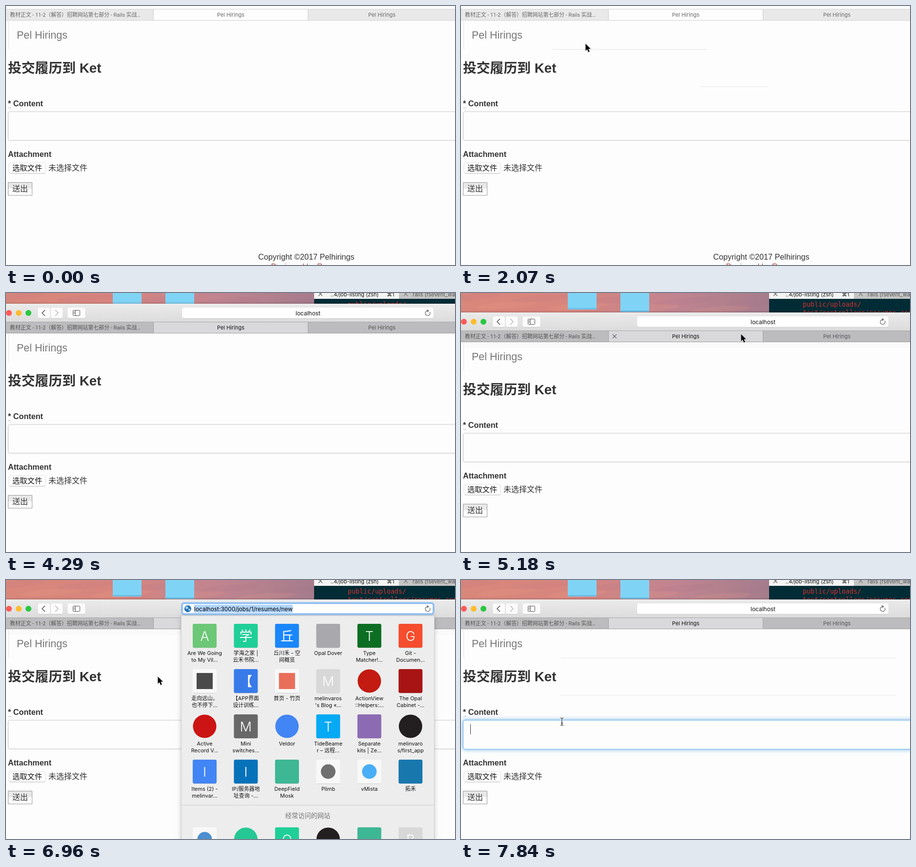
These frames come from a looping animation (921 px wide and 532 px high, 7990 ms). An HTML page with a canvas:

```html
<!DOCTYPE html>
<html lang="zh">
<head>
<meta charset="utf-8">
<title>Pel Hirings</title>
<style>
html, body { margin: 0; width: 921px; height: 532px; overflow: hidden; background: #fdfdfd; }
canvas { display: block; }
</style>
</head>
<body>
<canvas id="stage" width="921" height="532"></canvas>
<script>
const W = 921, H = 532, LOOP = 7990, STEP = LOOP / 54;
const c = document.getElementById('stage').getContext('2d');
const UI = 'Inter, "Noto Sans CJK SC", sans-serif';
const WEB = '"Liberation Sans", "Noto Sans CJK SC", sans-serif';
const MONO = '"DejaVu Sans Mono", monospace';
const SITE = 'Pel Hirings', URL_TEXT = 'localhost:3000/jobs/1/resumes/new';

// Pointer path: [step, x, y]; each run is one visit to the stage.
const visits = [
  [[3, 606, 268], [5, 500, 130], [7, 452, 16], [9, 452, 16], [10, 400, 60], [11, 290, 115],
   [12, 205, 131], [13, 189, 115], [14, 255, 77], [17, 474, -12]],
  [[23, 722, 22], [24, 727, 15]],
  [[32, 760, 50], [35, 574, 84], [39, 602, 66], [41, 602, 66], [44, 420, 165], [46, 325, 202],
   [47, 311, 198], [48, 307, 215], [50, 240, 290], [51, 215, 300], [53, 207, 291]]
];

// Favourites: [tile colour, glyph or shape, first line, second line]
const sites = [
  ['#6cc777', 'A', 'Are We Going', 'to My Vil...'],
  ['#20cf98', '学', '学海之家 |', '云禾书院…'],
  ['#1a87fd', '丘', '丘川禾 - 空', '间概览'],
  ['#a9a9ad', 'square', 'Opal Dover'],
  ['#0b6e22', 'T', 'Type', 'Matcher!...'],
  ['#f54d2d', 'G', 'Git -', 'Documen...'],
  ['#4a4a4a', 'inset', '走向远山，', '也不停下…'],
  ['#387be8', '【', '【APP界面', '设计训练…'],
  ['#ea6f5a', 'inset', '首页 - 竹页'],
  ['#d8d8d8', 'M', 'melinvaros', "'s Blog «..."],
  ['#c31a12', 'circle', 'ActionView', '::Helpers:...'],
  ['#a81414', 'square', 'The Opal', 'Cabinet -...'],
  ['#cc1414', 'circle', 'Active', 'Record V...'],
  ['#686868', 'M', 'Mini', 'switches...'],
  ['#4285f4', 'circle', 'Veldor'],
  ['#05a9f4', 'T', 'TideBeame', 'r – 远程…'],
  ['#8d6bb3', 'square', 'Separate', 'kits | Ze...'],
  ['#231f20', 'circle', 'melinvaro', 's/first_app'],
  ['#4285f4', 'I', 'Items (2) -', 'melinvar...'],
  ['#0672ba', 'I', 'IP/服务器地', '址查询 -…'],
  ['#3eb795', 'square', 'DeepField', 'Mosk'],
  ['#707070', 'disc', 'Plimb'],
  ['#49aef5', 'disc', 'vMista'],
  ['#1878ae', 'square', '拓禾'],
  ['#4b8fd0', 'disc', ''],
  ['#25c895', 'circle', ''],
  ['#20cf98', 'O', ''],
  ['#231f20', 'circle', ''],
  ['#3eb795', 'square', ''],
  ['#d8d8d8', 'B', '']
];

function text(s, x, y, font, color, align = 'left') {
  c.font = font;
  c.fillStyle = color;
  c.textAlign = align;
  c.fillText(s, x, y);
}

function rect(x, y, w, h, color) {
  c.fillStyle = color;
  c.fillRect(x, y, w, h);
}

function box(x, y, w, h, r, fill, stroke, lw = 1) {
  c.beginPath();
  c.roundRect(x, y, w, h, r);
  if (fill) { c.fillStyle = fill; c.fill(); }
  if (stroke) { c.strokeStyle = stroke; c.lineWidth = lw; c.stroke(); }
}

function disc(x, y, r, color) {
  c.fillStyle = color;
  c.beginPath();
  c.arc(x, y, r, 0, 7);
  c.fill();
}

function line(color, lw, ...pts) {
  c.strokeStyle = color;
  c.lineWidth = lw;
  c.beginPath();
  pts.forEach(([x, y]) => c.lineTo(x, y));
  c.stroke();
}

function cross(x, y, color) {
  line(color, 1.1, [x - 4, y - 4], [x + 4, y + 4]);
  line(color, 1.1, [x - 4, y + 4], [x + 4, y - 4]);
}

function vertical(y0, y1, from, to) {
  const g = c.createLinearGradient(0, y0, 0, y1);
  g.addColorStop(0, from);
  g.addColorStop(1, to);
  return g;
}

function pointerAt(s) {
  for (const run of visits) {
    if (s < run[0][0] || s > run[run.length - 1][0]) continue;
    const i = Math.max(1, run.findIndex(k => k[0] >= s));
    const a = run[i - 1], b = run[i], p = (s - a[0]) / (b[0] - a[0]);
    return [a[1] + (b[1] - a[1]) * p, a[2] + (b[2] - a[2]) * p];
  }
  return null;
}

function desktop() {
  const g = c.createLinearGradient(0, 0, 632, 0);
  g.addColorStop(0, '#d9877b');
  g.addColorStop(.35, '#d8857e');
  g.addColorStop(.7, '#c08490');
  g.addColorStop(1, '#a57c8c');
  rect(0, 0, W, 80, g);
  for (let i = 0; i < 9; i++) {
    c.fillStyle = i % 2 ? 'rgba(240,160,130,.14)' : 'rgba(150,100,130,.09)';
    c.beginPath();
    c.ellipse(i * 73 + 20, 8 + i * 17 % 31, 62, 7, -.08, 0, 7);
    c.fill();
  }
  for (const x of [219, 327]) {
    const h = x === 219 ? 34 : 39;
    box(x, -10, 59, h + 10, 2, '#7fd4f6');
    rect(x + 1, h - 3, 57, 2, '#62b9e2');
  }
  rect(632, 0, 289, 80, '#012b35');
  rect(632, 0, 174, 12, '#f4f4f4');
  rect(806, 0, 115, 12, '#c4c4c4');
  cross(645, 2, '#555');
  cross(820, 2, '#777');
  const f = '11px ' + UI;
  text('..4/job-listing (zsh)', 666, 6.5, f, '#111');
  text('⌘1', 781, 6.5, f, '#111');
  text('rails (fsevent_watch)', 834, 6.5, f, '#555');
  const m = '13.3px ' + MONO;
  text('public/uploads/', 701, 28, m, '#d5322f');
  text('test/controllers/resumes_controller', 701, 45, m, '#d5322f');
}

function toolbar(o, active) {
  if (!active) {
    rect(0, 0, W, o + 6, '#fdfdfd');
    return;
  }
  c.save();
  c.shadowColor = 'rgba(0,0,0,.4)';
  c.shadowBlur = 4;
  rect(-9, o - 31, W + 18, 38, '#e4e4e4');
  c.restore();
  rect(0, o - 31, W, 38, vertical(o - 31, o + 6, '#ebebeb', '#dcdcdc'));
  rect(0, o - 31, W, 1, '#f5f5f5');
  ['#fc5b57', '#fdbc2e', '#28c840'].forEach((k, i) => disc(6 + i * 20, o - 12, 6, k));
  for (const [x, w] of [[65, 25.5], [91.5, 25], [126, 37]]) {
    rect(x + 2, o - 1, w - 4, 1, '#c4c4c4');
    box(x, o - 23.5, w, 22.5, 4, '#fbfbfb', '#dadada', .6);
  }
  line('#555', 1.5, [80, o - 18], [74, o - 12], [80, o - 6]);
  line('#bbb', 1.5, [101, o - 18], [107, o - 12], [101, o - 6]);
  box(137.5, o - 17.5, 14, 11, 1, null, '#555');
  line('#555', 1, [142.5, o - 17], [142.5, o - 7]);
  for (const y of [15, 13, 11]) rect(139, o - y, 2, 1, '#555');
}

function address(s, o) {
  const open = s >= 41 && s < 48, y = o - 7.5;
  rect(363, o - 1, 512, 1, '#c6c6c6');
  box(361, o - 23.5, 516, 22.5, 4, '#fff', open ? '#8abdf4' : '#dcdcdc', open ? 3.5 : .6);
  const f = '11.95px ' + UI;
  if (open) {
    const x = s === 41 ? 432 : 386;
    c.font = f;
    rect(x, o - 20, c.measureText(URL_TEXT).width, 16, '#b1d5fb');
    text(URL_TEXT, x, y, f, s === 41 ? '#56626e' : '#000');
    const r = s === 41 ? 5 : 7;
    disc(373, o - 12, r, '#1f6fb5');
    disc(371, o - 14, r * .4, '#a5d8ef');
    disc(376, o - 10, r * .3, '#a5d8ef');
  } else {
    text('localhost', s === 48 ? 565 : 619.5, y, f, '#111', 'center');
  }
  c.strokeStyle = '#666';
  c.lineWidth = 1.2;
  c.beginPath();
  c.arc(865, o - 11.5, 5, -.5, 5.1);
  c.stroke();
  line('#666', 1.2, [863, o - 19], [867, o - 16.5], [863.5, o - 14]);
}

function tabs(o, active, mouse) {
  const edges = [0, 303, 620, 937];
  rect(0, o + 6, W, 24, active ? '#bcbbbd' : '#e9e9e9');
  rect(303, o + 6, 316, 24, active ? '#d9d8da' : '#fdfdfd');
  rect(0, o + 6, W, 1, active ? '#a9a9a9' : '#d4d4d4');
  rect(0, o + 29, W, 1, active ? '#a0a0a0' : '#cfcfcf');
  for (const x of [302, 619]) rect(x, o + 6, 1, 24, active ? '#a2a2a2' : '#cdcdcd');
  const dim = active ? '#555' : '#686868';
  text('教材正文 - 11-2（解答）招聘网站第七部分 - Rails 实战…', 8, o + 22,
    '10.9px Roboto, "Noto Sans CJK SC", sans-serif', dim);
  text(SITE, 461, o + 22, '11px ' + UI, active ? '#111' : '#686868', 'center');
  text(SITE, 771, o + 22, '11px ' + UI, dim, 'center');
  if (mouse && mouse[1] >= o + 7 && mouse[1] < o + 30) {
    const i = edges.findIndex(x => x > mouse[0]) - 1;
    cross(edges[i] + 12, o + 18, '#666');
  }
}

function page(s, o) {
  rect(0, o + 30, W, H, '#fdfdfd');
  if (s >= 35 && s < 48) rect(6, o + 30, W, 12, '#fafafa');
  line('#e2e2e2', 1, [5.5, o + 31], [5.5, o + 87], [8, o + 89]);
  if (s >= 4 && s < 28) rect(491, 165, 139, 1.5, '#eee');
  if (s >= 12 && s < 28) rect(186, 88.5, 319, 1.5, '#ebebeb');
  if (s >= 48) for (const y of [89, 166]) rect(204, o + y - .5, 689, 1.5, '#eee');

  text(SITE, 22, o + 67, '21.5px ' + WEB, '#777');
  text('投交履历到 Ket', 4, o + 137, 'bold 27.8px ' + WEB, '#333');
  const bold = 'bold 16.2px ' + WEB;
  text('* Content', 4, o + 206, bold, '#333');
  for (let x = 5; x < 11; x += 2) rect(x, o + 209, 1, 1, '#777');

  if (s >= 51) {
    c.save();
    c.shadowColor = 'rgba(102,175,233,.8)';
    c.shadowBlur = s === 51 ? 4 : 9;
    box(4.5, o + 217, 960, 59.5, 4, '#fdfdfd', '#7cbcec', 1.4);
    c.restore();
    box(5.2, o + 217.7, 960, 58, 4, '#fdfdfd');
    rect(19, o + 225, 1, 21, '#333');
  } else {
    box(4.5, o + 217, 960, 59.2, 4, '#fdfdfd', '#c8c8c8', 1.2);
  }

  text('Attachment', 4, o + 310, bold, '#333');
  box(6, o + 322, 75.5, 21.5, 4, '#fff', '#dedede');
  rect(8, o + 343.5, 72, 1, '#c6c6c6');
  text('选取文件', 13, o + 338, '15.3px ' + WEB, '#111');
  text('未选择文件', 87, o + 338, '16px ' + WEB, '#333');
  box(4.5, o + 362.5, 49, 26.5, 0, '#fff', '#999');
  rect(5, o + 363, 48, 12, '#e8e8e8');
  text('送出', 13, o + 381, '16px ' + WEB, '#333');
  text('Copyright ©2017 Pelhirings', 616, o + 521, '16.2px ' + WEB, '#333', 'center');
  text('Designed by Rowan', 616, o + 541, '16.2px ' + WEB, '#b5483f', 'center');
}

function tile([color, kind, first, second], x, y) {
  const mx = x + 24.5, my = y + 24.5;
  if (kind === 'circle') {
    disc(mx, my, 24, color);
  } else {
    const framed = kind === 'inset' || kind === 'disc';
    rect(x + 2, y + 48, 45, 2, 'rgba(0,0,0,.12)');
    box(x, y, 49, 49, 3, framed ? '#f8f8f8' : color);
    if (kind === 'inset') rect(x + 8, y + 8, 33, 33, color);
    else if (kind === 'disc') disc(mx, my, 15, color);
    else if (kind.length === 1) text(kind, mx, y + 34.5, '300 27px ' + UI, '#fff', 'center');
  }
  const f = '10.9px ' + UI;
  text(first, mx, y + 64, f, '#111', 'center');
  if (second) text(second, mx, y + 78, f, '#111', 'center');
}

function favourites(s) {
  c.save();
  if (s === 41) {
    c.globalAlpha = .58;
    c.translate(619, 76);
    c.scale(.991, .991);
    c.translate(-619, -76);
  }
  // The shadow stays outside the panel, so a fading panel is not darkened.
  c.save();
  c.beginPath();
  c.rect(0, 0, W, 600);
  c.rect(360, 74, 518, 480);
  c.clip('evenodd');
  c.shadowColor = 'rgba(0,0,0,.25)';
  c.shadowBlur = 10;
  rect(360, 74, 518, 480, '#ededed');
  c.restore();
  rect(360, 74, 518, 480, '#ededed');
  box(359.5, 73.5, 519, 480, 0, null, '#cfcfcf');
  sites.forEach((d, i) => {
    const row = Math.floor(i / 6);
    tile(d, 383 + i % 6 * 84.45, row < 4 ? 90 + row * 93 : 508);
  });
  rect(360, 462, 518, 1, '#cecece');
  text('经常访问的网站', 619, 489, '13.2px ' + UI, '#747474', 'center');
  c.restore();
}

function pointer([x, y], beam) {
  c.save();
  c.translate(Math.round(x), Math.round(y));
  if (beam) {
    for (const [k, w] of [['#fff', 3], ['#222', 1.2]]) {
      line(k, w, [-3, -8], [0, -6.5], [0, 6.5], [-3, 8]);
      line(k, w, [3, -8], [0, -6.5]);
      line(k, w, [3, 8], [0, 6.5]);
      line(k, w, [-2, 3], [2, 3]);
    }
  } else {
    c.beginPath();
    [[.5, .5], [.5, 15], [3.8, 12], [6.3, 17.7], [8.8, 16.6], [6.4, 11], [11, 11]]
      .forEach(([a, b]) => c.lineTo(a, b));
    c.closePath();
    c.shadowColor = 'rgba(0,0,0,.3)';
    c.shadowBlur = 2;
    c.strokeStyle = '#fff';
    c.lineWidth = 1.8;
    c.lineJoin = 'round';
    c.stroke();
    c.shadowBlur = 0;
    c.fillStyle = '#000';
    c.fill();
  }
  c.restore();
}

function draw(t) {
  const s = Math.floor((t + 7) / STEP) % 54;
  const p = Math.min(1, Math.max(0, (s - 27) / 4));
  const o = Math.round(71 * (1 - (1 - p) ** 2));
  const active = o > 0, mouse = pointerAt(s);
  c.clearRect(0, 0, W, H);
  if (active) desktop();
  toolbar(o, active);
  page(s, o);
  tabs(o, active, mouse);
  if (active) {
    if (s >= 41 && s < 48) favourites(s);
    address(s, o);
  }
  if (mouse) pointer(mouse, active && mouse[1] >= o + 215);
}

const start = performance.now();
function tick() {
  draw((performance.now() - start) % LOOP);
  requestAnimationFrame(tick);
}
tick();
</script>
</body>
</html>
```
